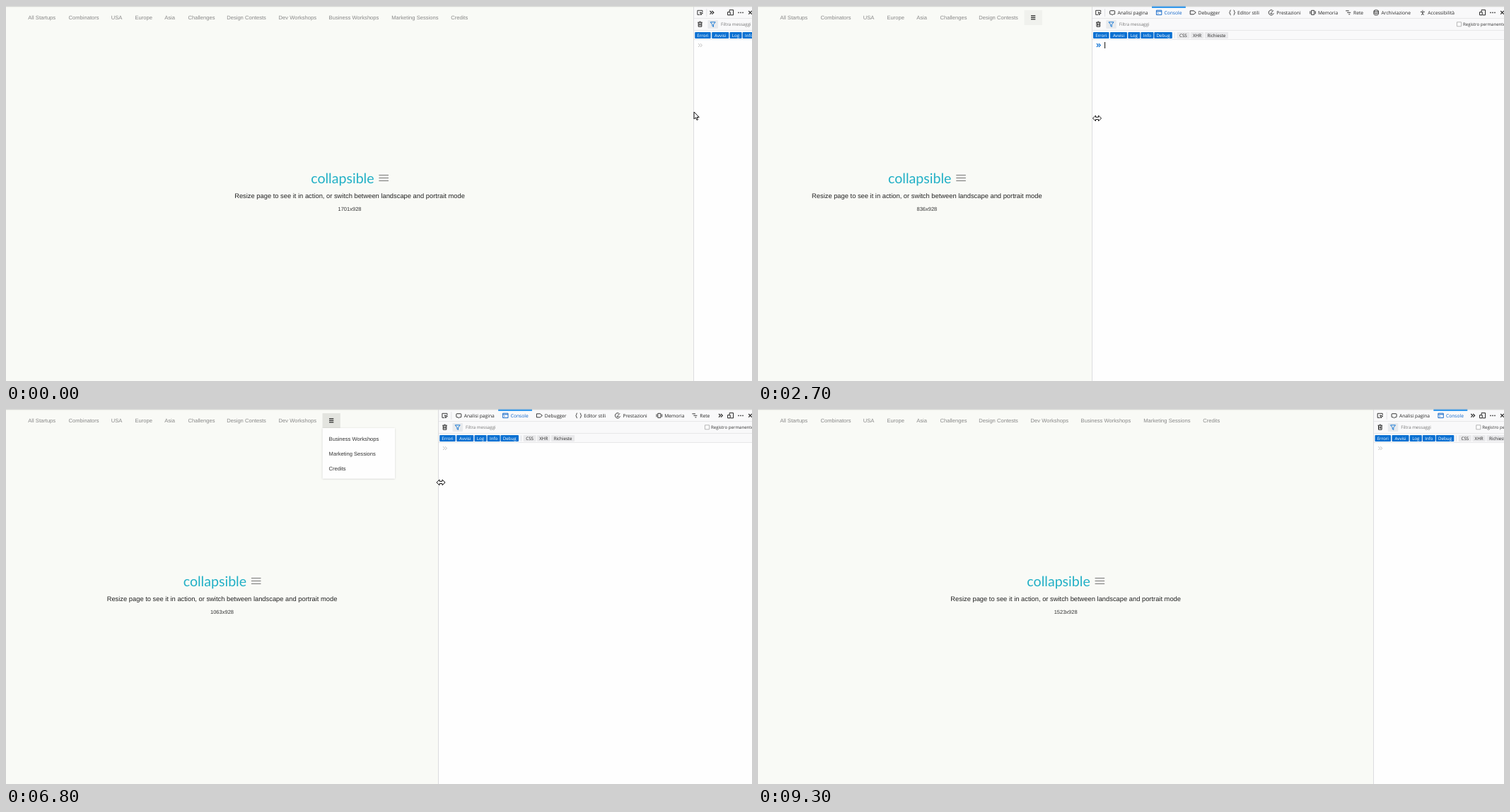
An HTML page with a canvas that plays this animation: 1055x531 px, repeating every 9.8 s.

```html
<!DOCTYPE html>
<html lang="en">
<head>
<meta charset="utf-8">
<title>Collapsible menu</title>
<style>
  html, body { margin: 0; height: 100%; overflow: hidden; background: #f9faf6; }
  canvas { display: block; }
</style>
</head>
<body>
<canvas id="stage" width="1055" height="531"></canvas>
<script>
const STAGE_W = 1055, STAGE_H = 531, LOOP = 9800, STEP = 100;
const ctx = document.getElementById('stage').getContext('2d');
ctx.textRendering = 'geometricPrecision';

const SANS = '"Liberation Sans", Arial, sans-serif';
const UI = '"Open Sans", "Noto Sans", sans-serif';
const BLUE = '#0a70d2', INK = '#222';

// [time, divider x]
const DIVIDER = [
  [400, 972], [1300, 716], [1600, 642.3], [1700, 642.3], [2300, 512], [2600, 477.7],
  [2700, 471.8], [3000, 455], [6100, 455], [6700, 607.4], [6800, 611], [8000, 799.4],
  [8100, 822], [8300, 870.3]
];

// [time, x, y]
const POINTER = [
  [200, 973, 150], [300, 974, 155], [400, 974, 155], [1300, 719, 155], [1700, 645, 156],
  [2300, 515, 158], [2700, 479.5, 159], [2900, 460, 159], [3400, 352, 38], [3600, 352, 38],
  [3800, 304, 12], [3900, 304, 12], [4100, 316, 17], [5000, 316, 17], [5500, 459, 85],
  [5600, 459, 85], [5700, 457, 88], [6100, 457, 88], [6800, 615, 104], [8000, 800, 107],
  [8100, 819, 107.5], [8300, 873, 107.5], [8400, 873, 107.5], [8500, 880, 107.5],
  [8600, 880, 103], [9200, 84, 7]
];

// [label, text x]
const MENU = [
  ['All Startups', 31.3], ['Combinators', 88.5], ['USA', 148.8], ['Europe', 182.4],
  ['Asia', 224.2], ['Challenges', 257.5], ['Design Contests', 312.2], ['Dev Workshops', 385.6],
  ['Business Workshops', 456.6], ['Marketing Sessions', 545.2], ['Credits', 629.2]
];
const ITEM_PAD = 9.1, BURGER_W = 25.3, MENU_END = 662, MENU_MARGIN = 65;

const ICON = {
  pick: 'M3.5-.5V-3h-7v6H0M0-.5l4 1.5-1.8.7-.7 1.8z',
  chevrons: 'M-2.5-2.4l2.4 2.4-2.4 2.4M.4-2.4l2.4 2.4L.4 2.4',
  trash: 'M-3.2-2.5h6.4M-1-3.5h2M-2.3-2.5v6h4.6v-6M-.8-1v3M.8-1v3',
  funnel: 'M-3.5-3.2h7L.8.2v3.2l-1.6-1V.2z',
  responsive: 'M-1.5-1.5v-2.2H4v7.2H0M-4-.7h3.6v4.2H-4z',
  close: 'M-2.3-2.3l4.6 4.6M2.3-2.3l-4.6 4.6',
  arrow: 'M0 0v10l2.3-2L4 11.5l1.6-.7L4 7.5h3.2z',
  resize: 'M-6 0l4-4v2.4h4V-4l4 4-4 4V1.6h-4V4z'
};

// [label, text offset from the divider, icon]
const TABS = [
  ['Analisi pagina', 36.7, 'M-2.7-2.6h5.4q.8 0 .8.8v3.4q0 .8-.8.8H1.3L0 3.4l-1.3-1h-1.4q-.8 0-.8-.8v-3.4q0-.8.8-.8z'],
  ['Console', 102.7, 'M-3.7-3.2h7.4v6.4h-7.4zM-3.7-1.6h7.4M-2 0l1 1-1 1'],
  ['Debugger', 150.8, 'M-4-2.5h5L4 0 1 2.5h-5z'],
  ['Editor stili', 206.2, 'M-2-3.5c-1.5 0-.5 3-2 3.5 1.5.5.5 3.5 2 3.5M2-3.5c1.5 0 .5 3 2 3.5-1.5.5-.5 3.5-2 3.5'],
  ['Prestazioni', 261.5, 'M3.4 1A3.6 3.6 0 1 1 1.6-3.2M0 0l3-3M-1.5 1.2h3'],
  ['Memoria', 320.2, 'M-2-3h4v6h-4zM-3.8-2v4M3.8-2v4'],
  ['Rete', 370.3, 'M-3.5-2.5h4.5M-1.5 0h5M.5 2.5h2'],
  ['Archiviazione', 409.8, 'M-3.2-2.3a3.2 1.2 0 1 0 6.4 0a3.2 1.2 0 1 0-6.4 0v4.6a3.2 1.2 0 0 0 6.4 0v-4.6M-3.2 0a3.2 1.2 0 0 0 6.4 0'],
  ['Accessibilità', 475.5, 'M-3-1h6M0-1v2l-1.5 2.5M0 1l1.5 2.5M0-3.4v1']
];
const TAB_LEAD = 17.5, TABS_END = 520;

// [label, offset, width, switched on]
const CHIPS = [
  ['Errori', 2.2, 22.5, true], ['Avvisi', 26.2, 24, true], ['Log', 51.5, 17, true],
  ['Info', 69.6, 18, true], ['Debug', 88.5, 25.5, true],
  ['CSS', 120.6, 18, false], ['XHR', 140, 18.5, false], ['Richieste', 160, 33.2, false]
];

function track(keys, t) {
  const next = keys.findIndex(key => key[0] > t);
  if (next === 0) return keys[0].slice(1);
  if (next < 0) return keys[keys.length - 1].slice(1);
  const a = keys[next - 1], b = keys[next];
  const f = (t - a[0]) / (b[0] - a[0]);
  return a.slice(1).map((v, i) => v + (b[i + 1] - v) * f);
}

function box(x, y, w, h, color) {
  ctx.fillStyle = color;
  ctx.fillRect(x, y, w, h);
}

function roundBox(x, y, w, h, r, color) {
  ctx.fillStyle = color;
  ctx.beginPath();
  ctx.roundRect(x, y, w, h, r);
  ctx.fill();
}

function text(str, x, y, size, color, family = SANS, align = 'left') {
  ctx.font = `${size}px ${family}`;
  ctx.textAlign = align;
  ctx.fillStyle = color;
  ctx.fillText(str, x, y);
}

function icon(path, x, y, color = INK, width = 0.9, fill) {
  const shape = new Path2D(path);
  ctx.save();
  ctx.translate(x, y);
  ctx.lineWidth = width;
  ctx.strokeStyle = color;
  if (fill) {
    ctx.fillStyle = fill;
    ctx.fill(shape);
  }
  ctx.stroke(shape);
  ctx.restore();
}

function drawMenu(width, active, open) {
  const limit = width - MENU_MARGIN;
  let shown = MENU.length;
  const burgerX = () => MENU[shown][1] - ITEM_PAD;
  if (MENU_END > limit) {
    do shown--; while (burgerX() + BURGER_W > limit);
  }
  for (const [label, x] of MENU.slice(0, shown)) text(label, x, 19, 7.6, '#888');
  if (shown === MENU.length) return;

  const x = burgerX();
  box(x, 6, BURGER_W, 21, active ? '#e3e4df' : '#f0f1ed');
  for (let i = 0; i < 3; i++) box(x + 9.5, 13.2 + i * 2.5, 6.3, 1.2, '#222');
  if (!open) return;

  const hidden = MENU.slice(shown);
  ctx.save();
  ctx.shadowColor = 'rgba(0,0,0,.25)';
  ctx.shadowBlur = 2.5;
  ctx.shadowOffsetY = 0.6;
  box(x, 27, 102.7, 8.3 + 21.15 * hidden.length, '#fefefe');
  ctx.restore();
  hidden.forEach(([label], i) => text(label, x + ITEM_PAD, 45 + 21.15 * i, 7.6, '#333'));
}

function drawHero(width, label) {
  const mid = width / 2;
  const line = 'Resize page to see it in action, or switch between landscape and portrait';
  const wrapped = width * 0.7 < 326;
  const shift = wrapped ? 7.3 : 0;
  text('collapsible', mid - 54.8, 250.8 - shift, 19.6, '#22b0c6', 'Lato, sans-serif');
  for (let i = 0; i < 3; i++) box(mid + 41.4, 239 + i * 4 - shift, 13.6, 1, '#777');
  if (wrapped) {
    text(line, width * 0.15, 264.2, 9.36, INK);
    text('mode', width * 0.15, 279, 9.36, INK);
  } else {
    text(line + ' mode', mid, 271.5, 9.36, INK, SANS, 'center');
  }
  text(label, mid, 290.2 + shift, 7.5, '#333', SANS, 'center');
}

function drawTabs(left) {
  const tabEnd = i => left + (i + 1 < TABS.length ? TABS[i + 1][1] - TAB_LEAD : TABS_END);
  let count = TABS.length;
  if (tabEnd(count - 1) > 1018) {
    do count--; while (count && tabEnd(count - 1) > 1004.5);
  }
  TABS.slice(0, count).forEach(([label, offset, path], i) => {
    const selected = label === 'Console';
    const color = selected ? '#0a62c8' : INK;
    if (selected) box(left + offset - TAB_LEAD, 1, 47.7, 1.4, '#0a84e8');
    icon(path, left + offset - 7.4, 9.3, color);
    text(label, left + offset, 11.8, 6.7, color, UI);
  });
  if (count < TABS.length) {
    icon(ICON.chevrons, count ? tabEnd(count - 1) + 7.2 : left + 26, 9.3, INK, 1.2);
  }
}

function drawPanel(left, focused, caret) {
  box(left, 1, STAGE_W - left, STAGE_H, '#fefefe');
  box(left, 1, STAGE_W - left, 47, '#f9f9fa');
  for (const y of [17, 34, 47]) box(left, y, STAGE_W - left, 0.7, '#e0e0e2');

  icon(ICON.pick, left + 9.4, 9.3);
  box(left + 18.5, 4, 0.7, 11, '#d7d7db');
  drawTabs(left);
  icon(ICON.responsive, 1024.6, 9.3, INK, 1);
  for (let i = 0; i < 3; i++) roundBox(1035.2 + i * 3, 8.6, 1.6, 1.6, 0.8, INK);
  icon(ICON.close, 1052.5, 9.3, INK, 1.1);

  icon(ICON.trash, left + 9.5, 25.7, INK, 1);
  roundBox(left + 20.5, 20, 14.5, 12, 1, '#e8eaed');
  icon(ICON.funnel, left + 27.7, 26, BLUE);
  text('Filtra messaggi', left + 39, 28, 6.15, '#777', UI);
  const checkX = Math.max(988, left + 145);
  icon('M.5.5h6v6h-6z', checkX, 22.3, '#999', 0.7, '#fff');
  text('Registro permanente', checkX + 9, 28, 6.1, '#333', UI);

  for (const [label, offset, width, on] of CHIPS) {
    roundBox(left + offset, 37, width, 9, 1, on ? BLUE : '#e9e9eb');
    text(label, left + offset + width / 2, 43.6, 6.2, on ? '#fff' : INK, UI, 'center');
  }
  box(left + 117, 37.5, 0.7, 8, '#d7d7db');

  icon(ICON.chevrons, left + 9.6, 55.6, focused ? BLUE : '#bbb', focused ? 1.2 : 1);
  if (caret) box(left + 18.3, 51, 1, 9, '#111');
  box(Math.round(left), 1, 1, STAGE_H, '#dcdcdf');
}

function drawPointer(t) {
  if (t >= 9300) return;
  const [x, y] = track(POINTER, t);
  const resizing = (t >= 300 && t < 3000) || (t >= 5700 && t < 8700);
  icon(resizing ? ICON.resize : ICON.arrow, x, y, '#111', 1, '#fff');
}

function draw(now) {
  const t = Math.floor((now % LOOP) / STEP) * STEP;
  const [divider] = track(DIVIDER, t);
  const [previous] = track(DIVIDER, t - STEP);
  const pageWidth = Math.max(divider, previous); // the page reflows late while shrinking
  const focused = t >= 300 && t < 4800;

  box(0, 0, STAGE_W, STAGE_H, '#f9faf6');
  drawMenu(pageWidth, t >= 4400, t >= 4800);
  drawHero(pageWidth, `${Math.round(previous * 1.75)}x928`);
  drawPanel(divider, focused, focused && !(t >= 3500 && t < 4000));
  box(0, 0, STAGE_W, 1.3, '#d6d7d4');
  if (divider < 920) {
    const selected = TABS[1][1] - TAB_LEAD;
    if (divider + selected + 47.7 <= 1004.5) box(divider + selected, 0.8, 47.7, 1.6, '#0a84e8');
  }
  drawPointer(t);
}

function frame() {
  draw(performance.now());
  requestAnimationFrame(frame);
}
frame();
</script>
</body>
</html>
```
